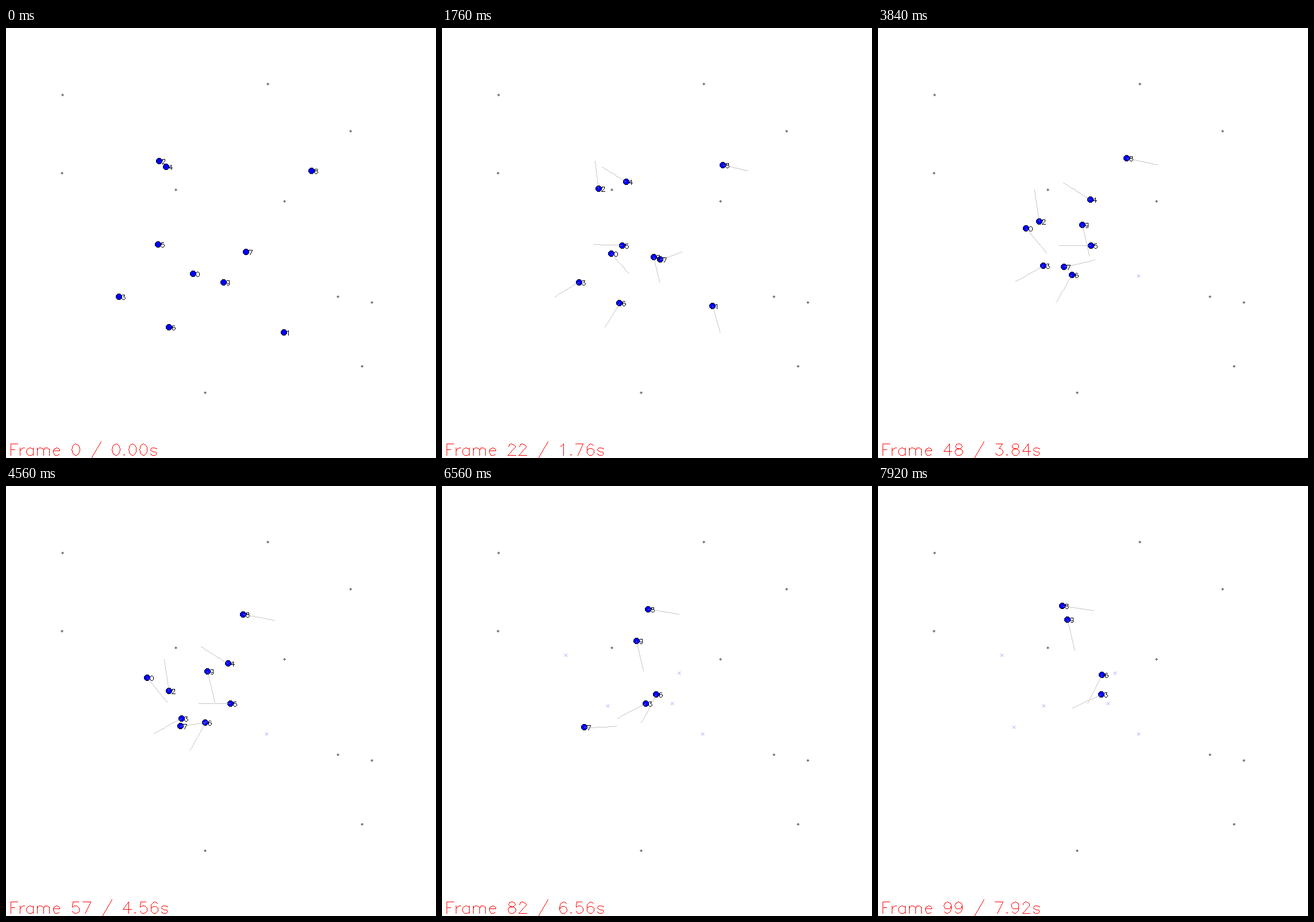
A matplotlib script for the animation above (8 s loop, 748 px wide and 748 px high).

```python
import numpy as np
import matplotlib.pyplot as plt
from matplotlib.animation import FuncAnimation
from matplotlib.patches import PathPatch
from matplotlib.path import Path

SIZE, DPI = 748, 88
FRAMES, STEP_MS = 100, 80
TRAIL = 25
SPEED = 2.21  # px per frame, shared by all agents

# start, goal, sideways bow in px, frames lost while getting going
AGENTS = [
    ((325, 427), (215, 294), -2, 1),
    ((483, 529), (453, 431), 1, 0.6),
    ((266, 231), (288, 382), 1.5, 0),
    ((196, 467), (390, 361), -3.5, 0),
    ((278, 241), (412, 325), 0, -0.5),
    ((264, 376), (400, 378), 1, 0),
    ((283, 520), (390, 326), 3, 0),
    ((417, 389), (236, 419), -10, 4),
    ((531, 248), (317, 208), 3, 2),
    ((378, 442), (329, 230), 0, 1.5),
]
LANDMARKS = [(98, 116), (455, 97), (599, 179), (97, 252), (295, 281),
             (484, 301), (577, 467), (636, 477), (619, 588), (346, 634)]


def walk(start, goal, bow, delay):
    """Pixel position in every frame, and the frame of arrival."""
    start, way = np.array(start), np.subtract(goal, start)
    length = np.hypot(*way)
    t = np.arange(FRAMES)
    u = SPEED * (t - delay * (1 - np.exp(-t / 3))) / length
    u = np.minimum(u, 1)[:, None]
    side = np.array([-way[1], way[0]]) / length
    path = start + way * u + side * 4 * bow * u * (1 - u)
    return np.round(path), round(length / SPEED + delay)


def arc(cx, cy, rx, ry, start, end):
    steps = max(6, int(abs(end - start) / 22))
    a = np.radians(np.linspace(start, end, steps + 1))
    return list(zip(cx + rx * np.cos(a), cy + ry * np.sin(a)))


SIX = arc(11, 12, 7, 9, 45, 180) + arc(10.5, 6.5, 6.5, 6.5, 180, 540)
STEM = [(4, 14), (4, 0)]
HUMP = arc(9.5, 9, 5.5, 5, 170, 0) + [(15, 0)]

# Single-stroke letters: advance width and strokes, y up from the baseline.
GLYPHS = {
    " ": (16, []),
    "0": (20, [arc(10, 10.5, 7, 10.5, 0, 360)]),
    "1": (20, [[(6, 17), (8, 18), (11, 21), (11, 0)]]),
    "2": (20, [arc(10, 16, 6, 5, 180, -30) + [(3, 0), (17, 0)]]),
    "3": (20, [[(5, 21), (16, 21), (10, 13)] + arc(10, 6.5, 7, 6.5, 65, -160)]),
    "4": (20, [[(13, 0), (13, 21), (3, 7), (18, 7)]]),
    "5": (20, [[(15, 21), (5, 21), (4, 12)] + arc(10, 7, 7, 7, 135, -155)]),
    "6": (20, [SIX]),
    "7": (20, [[(3, 21), (17, 21), (7, 0)]]),
    "8": (20, [arc(10, 16.5, 6, 4.5, 0, 360), arc(10, 6.1, 7, 6.1, 0, 360)]),
    "9": (20, [[(20 - x, 21 - y) for x, y in SIX]]),
    "F": (17, [[(4, 0), (4, 21), (17, 21)], [(4, 11), (12, 11)]]),
    "r": (13, [STEM, arc(11, 6, 7, 8, 165, 80)]),
    "a": (19, [[(15, 14), (15, 0)], arc(9.5, 7, 6.5, 7, 35, 325)]),
    "m": (30, [STEM, HUMP, [(x + 11, y) for x, y in HUMP]]),
    "e": (18, [[(3, 8)] + arc(9, 7, 6, 7, 8, 320)]),
    "s": (17, [arc(8.5, 10.8, 5.5, 3.2, 10, 250) + arc(8.5, 3.5, 5.5, 3.5, 70, -170)]),
    "/": (22, [[(20, 25), (2, -7)]]),
    ".": (10, [[(5, 2), (4, 1), (5, 0), (6, 1), (5, 2)]]),
}


def pixel_line(stroke):
    """Cells of a hard-edged, one pixel wide polyline."""
    points = np.floor(np.array(stroke) + 0.5)
    cells = [points[:1]]
    for a, b in zip(points, points[1:]):
        steps = int(np.abs(b - a).max())
        cells.append(np.floor(np.linspace(a, b, steps + 1) + 0.5))
    return np.concatenate(cells)


def text_cells(text, x, y, scale):
    cells = []
    for char in text:
        width, strokes = GLYPHS[char]
        cells += [pixel_line(np.array(s) * (scale, -scale) + (x, y)) for s in strokes]
        x += width * scale
    return cells


GRID = np.array([(x, y) for x in range(-5, 6) for y in range(-5, 6)])
REACH = (GRID ** 2).sum(axis=1)
DISC = GRID[REACH <= 20]
RING = GRID[(REACH > 20) & (REACH <= 29)]
DIAMOND = GRID[np.abs(GRID).sum(axis=1) <= 2]
CROSS = GRID[(np.abs(GRID[:, 0]) == np.abs(GRID[:, 1])) & (REACH <= 8)]

CORNERS = np.array([(-.5, -.5), (.5, -.5), (.5, .5), (-.5, .5), (-.5, -.5)])
SQUARE = [Path.MOVETO, Path.LINETO, Path.LINETO, Path.LINETO, Path.CLOSEPOLY]


def cell_path(parts):
    """One path made of a unit square for every distinct cell."""
    if not parts:
        return Path(np.empty((0, 2)))
    cells = np.unique(np.concatenate(parts), axis=0)
    corners = (cells[:, None] + CORNERS).reshape(-1, 2)
    return Path(corners, np.tile(SQUARE, len(cells)))


fig = plt.figure(figsize=(SIZE / DPI, SIZE / DPI), dpi=DPI, facecolor="white")
ax = fig.add_axes([0, 0, 1, 1])
ax.set_xlim(-0.5, SIZE - 0.5)
ax.set_ylim(SIZE - 0.5, -0.5)
ax.axis("off")


def layer(color, zorder, alpha=None, parts=()):
    return ax.add_patch(PathPatch(cell_path(parts), fc=color, ec="none", lw=0,
                                  alpha=alpha, snap=False, zorder=zorder))


layer("#808080", 1, parts=[DIAMOND + spot for spot in LANDMARKS])
dots = layer("#0000ff", 2)
ink = layer("#000000", 3)
trails = layer("#a0a0a0", 4, alpha=0.6)
crosses = layer("#9999ff", 5)
caption = layer("#ff0000", 6)

WALKS = [walk(*agent) for agent in AGENTS]


def draw(frame):
    dot_cells, ink_cells, trail_cells, cross_cells = [], [], [], []
    for name, (path, arrival) in enumerate(WALKS):
        x, y = path[frame]
        if frame >= arrival:
            cross_cells.append(CROSS + (x, y))
            continue
        dot_cells.append(DISC + (x, y))
        ink_cells += [RING + (x, y), *text_cells(str(name), x + 4, y + 5, 0.4)]
        if frame:
            trail_cells.append(pixel_line(path[max(0, frame - TRAIL):frame + 1]))
    dots.set_path(cell_path(dot_cells))
    ink.set_path(cell_path(ink_cells))
    trails.set_path(cell_path(trail_cells))
    crosses.set_path(cell_path(cross_cells))
    seconds = frame * STEP_MS / 1000
    title = f"Frame {frame} / {seconds:.2f}s"
    caption.set_path(cell_path(text_cells(title, 4, 743, 0.95)))
    return [dots, ink, trails, crosses, caption]


animation = FuncAnimation(fig, draw, frames=FRAMES, interval=STEP_MS,
                          repeat=True, repeat_delay=0, blit=False)
plt.show()
```
